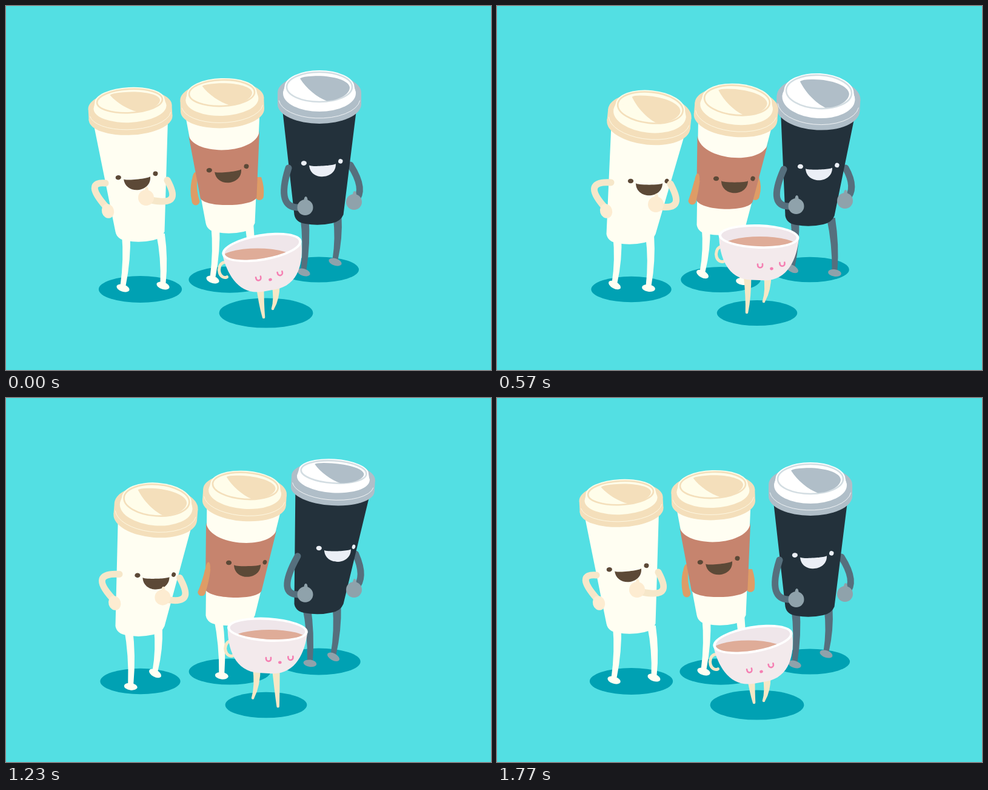
Write an HTML page with a canvas that moves like this. It is 800x600 px and loops after 1800 ms.

```html
<!DOCTYPE html>
<html lang="en">
<head>
<meta charset="utf-8">
<title>Strolling cups</title>
<style>
html, body { margin: 0; width: 100%; height: 100%; overflow: hidden; background: #53dfe3; }
canvas { display: block; }
</style>
</head>
<body>
<canvas id="stage" width="800" height="600"></canvas>
<script>
const g = document.getElementById('stage').getContext('2d');
const LOOP = 1800, RAD = Math.PI / 180;
const TIMES = [0, 360, 570, 840, 1080, 1380, 1770];

// Each list holds one value per key time; a missing last value repeats the first.
// e: lid centre, r: lid height, a: tilt, b: base, m: mouth, eye: far eye offset, f/h: left and right foot
const white = {
  ex: [204, 241, 253, 242, 251, 241], ey: [156, 175, 167, 147, 158, 175],
  r: [22, 31, 28, 17, 24, 31], a: [-3, 2, 6, 4, 6, 2],
  bx: 221, by: [389, 395, 393, 385, 390, 395], eye: [31, 30, 29, 25, 28, 30],
  mx: [216, 239, 251, 254, 253, 239], my: [283, 301, 292, 279, 287, 301], ma: [-6, -1, 0, -4, -2, -1],
  fx: [193, 191, 194, 205, 208, 202], fy: [461, 455, 456, 462, 472, 469],
  hx: [259, 260, 250, 246, 246, 246], hy: [457, 469, 461, 456, 453, 448],
  sx: [164, 184, 188, 187, 188, 184], sy: [292, 292, 291, 285, 288, 292],
  cx: [128, 137, 139, 127, 133, 137], px: [168, 176, 180, 181, 181, 176], py: 338,
  ux: [266, 284, 286, 282, 287, 284], uy: [287, 298, 293, 285, 293, 298],
  qx: [231, 250, 262, 267, 265, 250], qy: [316, 334, 327, 307, 320, 334],
  hipL: 200, hipR: 253, sx0: 221.5, sy0: 467, sr: 68, base: 390
};
const sleeved = {
  ex: [356, 374, 396, 393, 390, 397], ey: [143, 152, 155, 136, 132, 157],
  r: [24, 29, 27, 20, 18, 31], a: [-2, 2, 5, 4, 4, 4],
  bx: 370, by: [375, 378, 378, 373, 371, 380], eye: [31, 31, 30, 26, 27, 30.5],
  mx: [366, 376, 392, 403, 401, 393], my: [271, 281, 288, 271, 263, 287], ma: [-6, -3, 0, -3, -2, 0],
  fx: [341, 340, 339, 345, 353, 356], fy: [447, 443, 438, 441, 447, 459],
  hx: [402, 407, 405, 400, 400, 411], hy: [446, 449, 450, 446, 440, 434],
  sx: [311, 315, 330, 335, 334, 330], sy: [286, 290, 288, 278, 278, 288],
  px: [313, 317, 322, 324, 323, 322], py: [322, 321, 321, 319, 319, 321],
  ux: [417, 422, 428, 412, 412, 428], qx: [418, 422, 426, 406, 406, 426], qy: [313, 314, 313, 308, 308, 313],
  hipL: 347, hipR: 401, sx0: 369, sy0: 451, sr: 67, base: 376
};
const dark = {
  ex: [517, 504, 531, 546, 535, 546], ey: [133, 127, 141, 131, 114, 131],
  r: [27, 25, 30, 26, 17, 26], a: [0, -1, 3, 4, 3, 4],
  bx: 516, by: [361, 359, 363, 360, 354, 360], eye: [30, 30, 30, 27.5, 26, 28],
  mx: [522, 514, 531, 547, 547, 546], my: [261, 254, 267, 264, 242, 260], ma: [-3, -5, -2, -1, -3, -1],
  fx: [491, 488, 487, 492, 498, 503], fy: [435, 430, 429, 429, 428, 439],
  hx: [543, 555, 557, 546, 541, 540], hy: [418, 428, 436, 430, 425, 421],
  sx: [466, 461, 473, 481, 481, 481], sy: [267, 265, 269, 265, 258, 265],
  px: 493.5, py: [332, 322, 330, 334, 324, 326],
  ux: [568, 562, 575, 577, 576, 577], uy: [262, 256, 267, 262, 253, 262],
  qx: 574, qy: [323, 314, 321, 325, 316, 318],
  hipL: 493, hipR: 548, sx0: 516, sy0: 434.5, sr: 66, base: 361
};
const tea = {
  x: [422, 428, 432, 436.5, 434.5, 428], y: [398, 378, 380, 394, 388, 378],
  r: [22, 22, 20, 16, 17, 22], a: [-9.5, -1, 2, 8, 6, 0],
  mx: [436, 446, 453, 460, 457, 446], my: [451, 432, 433, 447, 442, 432],
  kx: [361, 367, 371, 377, 375, 367], ky: [435, 412, 409, 420, 416, 412],
  fx: [425, 416, 412, 408, 408, 407, 424], fy: [513, 509, 505, 502, 499, 491, 502],
  hx: [440, 438, 440, 454, 452, 445], hy: [499, 490, 487, 494, 510, 503],
  hipL: [419, 414, 413, 414, 414, 413], hipR: [445, 446, 446, 454, 446, 445]
};

const paper = { body: '#fffef2', rim: '#f4dfbb', lid: '#fffdea', groove: '#f4dfbb', leg: '#fffef2', foot: '#fffef2',
  arm: '#f6e7c9', hand: '#fdecd1', mouth: '#5c4937' };
const night = { body: '#23313b', rim: '#b0bec8', lid: '#ffffff', groove: '#d3dde2', leg: '#566f7d', foot: '#8fa2ab',
  arm: '#566f7d', hand: '#8fa2ab', mouth: '#ebeff6' };

// Smooth periodic curve through the key values
function key(v, t) {
  const n = TIMES.length;
  const wrap = i => (i + n) % n;
  const val = i => v[wrap(i) % v.length];
  const time = i => TIMES[wrap(i)] + LOOP * Math.floor(i / n);
  const rate = i => (val(i + 1) - val(i)) / (time(i + 1) - time(i));
  const slope = i => {
    const h0 = time(i) - time(i - 1), h1 = time(i + 1) - time(i), d0 = rate(i - 1), d1 = rate(i);
    const m = (d0 * h1 + d1 * h0) / (h0 + h1), max = 3 * Math.min(Math.abs(d0), Math.abs(d1));
    return Math.max(-max, Math.min(max, m));
  };
  let i = n - 1;
  while (TIMES[i] > t) i--;
  const h = time(i + 1) - time(i), s = (t - time(i)) / h, s2 = s * s, s3 = s2 * s;
  return val(i) * (2 * s3 - 3 * s2 + 1) + val(i + 1) * (3 * s2 - 2 * s3)
    + h * (slope(i) * (s3 - 2 * s2 + s) + slope(i + 1) * (s3 - s2));
}
const pose = (o, t) => Object.fromEntries(
  Object.entries(o).map(([k, v]) => [k, Array.isArray(v) ? key(v, t) : v]));
const mix = (a, b, k) => a + (b - a) * k;
const smooth = (a, b, x) => { const s = Math.max(0, Math.min(1, (x - a) / (b - a))); return s * s * (3 - 2 * s); };

function fill(d, color) { g.fillStyle = color; g.fill(new Path2D(d)); }
function stroke(d, color, w) {
  g.strokeStyle = color; g.lineWidth = w; g.lineCap = g.lineJoin = 'round'; g.stroke(new Path2D(d));
}
function oval(x, y, rx, ry, color, rot = 0) {
  g.fillStyle = color; g.beginPath(); g.ellipse(x, y, rx, ry, rot, 0, 7); g.fill();
}
function ring(x, y, rx, ry, color, w, from = 0, to = 2 * Math.PI) {
  g.strokeStyle = color; g.lineWidth = w; g.beginPath(); g.ellipse(x, y, rx, ry, 0, from, to); g.stroke();
}
function placed(x, y, deg, draw) {
  g.save(); g.translate(x, y); g.rotate(deg * RAD); draw(); g.restore();
}
function limb(x0, y0, cx, cy, x1, y1, w0, w1, color) {
  const w = (w0 + w1) / 2;
  fill(`M${x0 - w0} ${y0}Q${cx - w} ${cy} ${x1 - w1} ${y1}A${w1} ${w1} 0 0 0 ${x1 + w1} ${y1}Q${cx + w} ${cy} ${x0 + w0} ${y0}Z`, color);
}
function arm(x0, y0, cx, cy, x1, y1, color) { stroke(`M${x0} ${y0}Q${cx} ${cy} ${x1} ${y1}`, color, 11); }
function thumbUp(x, y, color) {
  oval(x, y, 13, 13, color);
  oval(x + 1, y - 12, 3, 6, color);
}

function legs(p, c, t) {
  const swing = 0.2 * Math.sin(2 * Math.PI * t / LOOP);
  const leg = (x, y, hip, rot) => {
    const hx = mix(hip, x, 0.3), hy = p.by - 14;
    limb(hx, hy, (hx + x) / 2 + 5, (hy + y) / 2, x, y, 7, 4.5, c.leg);
    oval(x, y + 4, 11, 5.8, c.foot, rot);
  };
  leg(p.hx, p.hy, p.hipR, 0.32 - swing);
  leg(p.fx, p.fy, p.hipL, 0.32 + swing);
}

// Point on the cup's side: side -1 or 1, f from lid (0) to base (1)
function sidePoint(p, side, f, extra = 0) {
  const c = Math.cos(p.a * RAD), s = Math.sin(p.a * RAD), w = 61 * side;
  return [mix(p.ex + w * c - 38 * s, p.bx + 40.5 * side, f) + extra * side,
    mix(p.ey + w * s + 38 * c, p.by - 17, f)];
}

function body(p, color) {
  const { bx: x, by: y } = p;
  fill(`M${sidePoint(p, -1, 0)}L${x - 40.5} ${y - 17}Q${x - 38} ${y - 4} ${x - 22} ${y - 2}Q${x} ${y + 2} ${x + 22} ${y - 3}`
    + `Q${x + 36} ${y - 6} ${x + 40.5} ${y - 17}L${sidePoint(p, 1, 0)}Z`, color);
}

function sleeve(p) {
  const [a, b, c, d] = [[-1, 0.15], [1, 0.15], [1, 0.765], [-1, 0.765]].map(([s, f]) => sidePoint(p, s, f, 1));
  const top = (p.r * 0.7 + 13) * 4 / 3, low = p.r * 0.65;
  fill(`M${a}C${a[0] + 4} ${a[1] + top} ${b[0] - 4} ${b[1] + top} ${b}L${c}`
    + `C${c[0] - 8} ${c[1] + low} ${d[0] + 8} ${d[1] + low} ${d}Z`, '#c6846e');
}

function lid(p, c) {
  const r = p.r, ry = r * 0.85 + 9;
  placed(p.ex, p.ey, p.a, () => {
    oval(0, 10, 69, ry, c.rim);
    oval(0, 29, 69, ry, c.rim);
    g.fillRect(-69, 10, 138, 19);
    ring(0, 20, 67, ry, c.lid, 0.8, 0.1, Math.PI - 0.1);
    oval(0, 11, 60, r + 3, c.lid);
    oval(0, 0, 57.5, r, c.lid);
    fill('M-57.5 0L-60 11L60 11L57.5 0Z', c.lid);
    ring(0, 0.5, 54, r - 2.5, c.groove, 2.6);
    const y = k => (k * r).toFixed(2);
    fill(`M-32 ${y(-0.5)}Q-28 ${y(-0.63)} -10 ${y(-0.65)}C20 ${y(-0.7)} 49 ${y(-0.4)} 50 ${y(0.05)}`
      + `C50 ${y(0.5)} 30 ${y(0.85)} 12 ${y(0.87)}C-4 ${y(0.65)} -22 ${y(0.1)} -32 ${y(-0.5)}Z`, c.rim);
  });
}

function face(p, color, k) {
  placed(p.mx, p.my, p.ma, () => {
    const y = mix(-3.5, -8, k), ry = mix(3.8, 1.7, k);
    oval(-30.5, y, 4.6, ry, color, mix(0, 0.2, k));
    oval(p.eye, y, 4 - (31 - p.eye) * 0.3, ry, color, mix(0.3, -0.4, k));
    const w = mix(22, 8, k), low = mix(27, 7.5, k), top = mix(3.5, -7.5, k);
    fill(`M${-w} 0C${-w} ${top} ${w} ${top} ${w} 0C${w} ${low} ${-w} ${low} ${-w} 0Z`, color);
  });
}

function shadow(p) {
  const r = p.sr - 0.6 * (p.by - p.base);
  oval(p.sx0, p.sy0, r, r * 0.32, '#00a1b3');
}

function drawWhite(p, t, k) {
  legs(p, paper, t);
  body(p, paper.body);
  lid(p, paper);
  face(p, paper.mouth, k);
  arm(p.sx, p.sy, p.cx, p.sy - 3, p.px - 3, p.py - 7, paper.arm);
  oval(p.px, p.py, 10, 12, paper.hand, -0.3);
  stroke(`M${p.ux} ${p.uy}c12 22 18 42 ${p.qx + 9 - p.ux} ${p.qy + 4 - p.uy}`, paper.arm, 11);
  thumbUp(p.qx, p.qy, paper.hand);
}

function drawSleeved(p, t, k) {
  const skin = '#de9c66';
  const left = () => {
    oval(p.sx, p.sy, 4, 12, skin, 0.1);
    limb(p.sx, p.sy, p.sx - 3, (p.sy + p.py) / 2, p.px, p.py, 4.5, 6.5, skin);
  };
  const front = p.ex > 385;
  legs(p, paper, t);
  limb(p.ux, 282, p.ux + 4, 298, p.qx, p.qy, 4, 7, skin);
  if (!front) left();
  body(p, paper.body);
  sleeve(p);
  lid(p, paper);
  face(p, paper.mouth, k);
  if (front) left();
}

function drawDark(p, t, k) {
  legs(p, night, t);
  arm(p.ux, p.uy, 594, p.qy - 20, p.qx + 2, p.qy - 2, night.arm);
  body(p, night.body);
  thumbUp(p.qx, p.qy, night.hand);
  lid(p, night);
  face(p, night.mouth, k);
  arm(p.sx, p.sy, p.px - 49, p.py + 3, p.px - 8, p.py, night.arm);
  thumbUp(p.px, p.py, night.hand);
}

function drawTea(p) {
  const skin = '#f6e7c5', pink = '#f57fb2';
  const sr = 65 + 0.62 * (p.y - 378), hipY = p.y + 62;
  oval(429, 506, sr, sr * 0.317, '#00a1b3');
  const leg = (hip, x, y) => limb(hip, hipY, hip + 2, mix(hipY, y, 0.6), x, y, 6.5, 2.3, skin);
  leg(p.hipL, p.fx, p.fy);
  leg(p.hipR, p.hx, p.hy);
  const handle = () => ring(p.kx, p.ky, 9.5, 12.5, skin, 5, 1.2, 5.2);
  const front = p.a > 4;
  if (!front) handle();
  placed(p.x, p.y, p.a, () => {
    const rx = 62, ry = p.r - 4;
    fill('M-66 0C-64 35 -50 72 -10 72L10 72C50 72 64 35 66 0Z', '#f3eaec');
    oval(0, 0, 66.5, p.r, '#ffffff');
    oval(0, 0, rx, ry, '#efe6ea');
    g.save();
    g.beginPath(); g.ellipse(0, 0, rx, ry, 0, 0, 7); g.clip();
    placed(p.a * 1.1, ry, -p.a, () => oval(0, 0, rx, ry, '#dfac98'));
    g.restore();
  });
  if (front) handle();
  placed(p.mx, p.my, (p.a - 7) * 0.8, () => {
    for (const x of [-18.5, 18]) stroke(`M${x - 4} -9v2a4 4 0 0 0 8 0v-2`, pink, 2.6);
    oval(0, 0, 2.8, 2.4, pink);
  });
}

function draw(now) {
  const t = now % LOOP;
  const blink = smooth(640, 760, t) * (1 - smooth(900, 1010, t));
  const [w, s, d] = [white, sleeved, dark].map(o => pose(o, t));
  g.fillStyle = '#53dfe3';
  g.fillRect(0, 0, 800, 600);
  [w, s, d].forEach(shadow);
  drawDark(d, t, blink);
  drawSleeved(s, t, blink);
  drawWhite(w, t, blink);
  drawTea(pose(tea, t));
}

let start;
function tick(now) {
  start ??= now;
  draw(now - start);
  requestAnimationFrame(tick);
}
draw(0);
requestAnimationFrame(tick);
</script>
</body>
</html>
```
